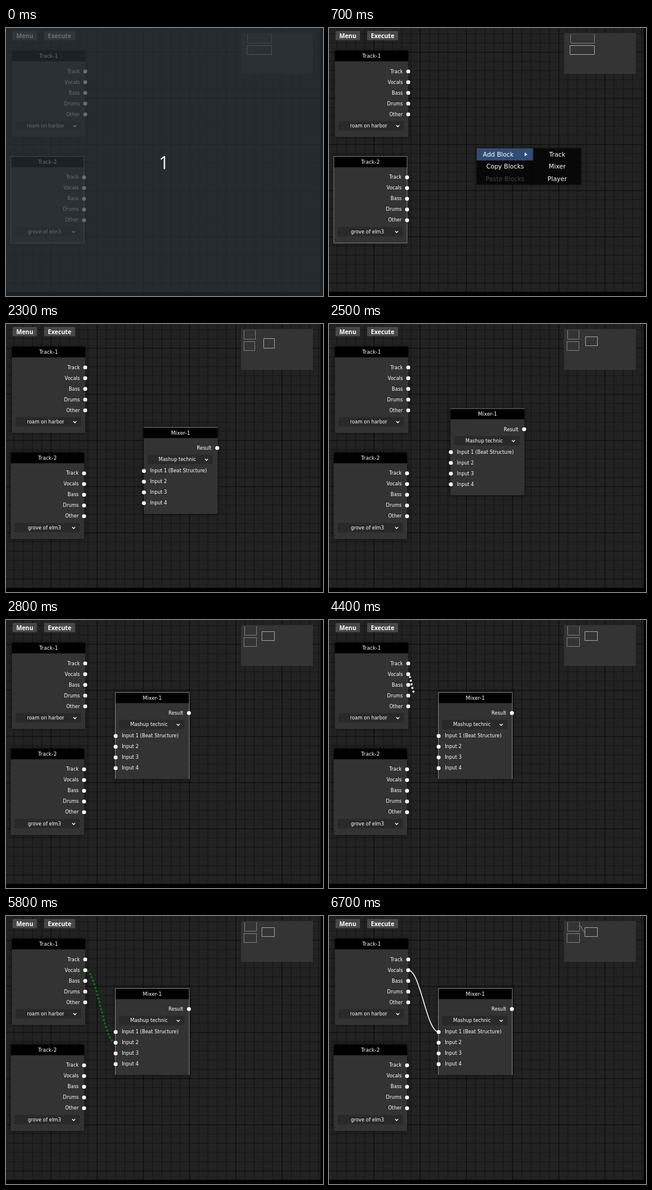
An HTML page with a canvas for the animation above (8000 ms loop, 532 by 450 pixels).

```html
<!DOCTYPE html>
<html lang="en">
<head>
<meta charset="utf-8">
<title>Node editor</title>
<style>
  html, body { margin: 0; width: 100%; height: 100%; overflow: hidden; background: #000; }
  canvas { display: block; }
</style>
</head>
<body>
<canvas id="stage" width="532" height="450"></canvas>
<script>
const ctx = document.getElementById('stage').getContext('2d');
const LOOP = 8000;
const SANS = '"DejaVu Sans", sans-serif';
const STEMS = ['Track', 'Vocals', 'Bass', 'Drums', 'Other'];
const INPUTS = ['Input 1 (Beat Structure)', 'Input 2', 'Input 3', 'Input 4'];
// Mixer positions while it is dragged, one per 100 ms from 2200
const DRAG = [[242, 190], [231, 173.5], [217, 156], [204, 142], [194, 132], [187, 125], [183.5, 121.5]];
const OUT = [133, 91];

function rect(x, y, w, h, fill) {
  ctx.fillStyle = fill;
  ctx.fillRect(x, y, w, h);
}

function rounded(x, y, w, h, r, fill) {
  ctx.fillStyle = fill;
  ctx.beginPath();
  ctx.roundRect(x, y, w, h, r);
  ctx.fill();
}

function label(str, x, y, size, align = 'center', color = '#fff', family = SANS, weight = 400) {
  ctx.font = `${weight} ${size}px ${family}`;
  ctx.textAlign = align;
  ctx.fillStyle = color;
  ctx.fillText(str, x, y + size * 0.36);
}

function line(points, color, width) {
  ctx.strokeStyle = color;
  ctx.lineWidth = width;
  ctx.beginPath();
  points.forEach(p => ctx.lineTo(...p));
  ctx.stroke();
}

function dot(x, y) {
  ctx.fillStyle = '#fff';
  ctx.beginPath();
  ctx.arc(x, y, 3.3, 0, 7);
  ctx.fill();
}

function shadowed(draw, blur) {
  ctx.save();
  ctx.shadowColor = 'rgba(0,0,0,.6)';
  ctx.shadowBlur = blur;
  draw();
  ctx.restore();
}

function grid() {
  rect(0, 0, 532, 450, '#222');
  const rule = (step, x0, y0, width, color) => {
    for (let x = x0; x < 528; x += step) rect(x, 0, width, 443, color);
    for (let y = y0; y < 443; y += step) rect(0, y, 528, width, color);
  };
  rule(15.5, 13, 9, 0.8, 'rgba(0,0,0,.5)');
  rule(77.5, 75, 40, 1.3, 'rgba(0,0,0,.4)');
  rect(528, 0, 4, 450, '#000');
  rect(0, 443, 532, 7, '#000');
}

function nodeFrame({ x, y, w, h, title, border }) {
  shadowed(() => rounded(x, y, w, h, 2, '#333'), 6);
  rounded(x, y, w, 18, [2, 2, 0, 0], '#000');
  label(title, x + w / 2, y + 8.9, 8.7);
  if (!border) return;
  const corners = [[x, y + h], [x, y], [x + w, y], [x + w, y + h], [x, y + h]];
  line(corners.slice(...border), '#8c8c8c', 0.9);
}

function select(str, x, y) {
  rounded(x + 6, y - 8, 110, 16, 2, '#292929');
  label(str, x + 56.5, y, 8);
  line([[x + 103, y - 1], [x + 105.5, y + 1.6], [x + 108, y - 1]], '#fff', 1.3);
}

function trackNode(node) {
  const { x, y, w } = node;
  nodeFrame(node);
  STEMS.forEach((stem, i) => {
    label(stem, x + w - 9, y + 34.8 + i * 18, 8, 'right');
    dot(x + w, y + 35 + i * 18);
  });
  select(node.choice, x, y + 126.2);
}

function mixerNode(node) {
  const { x, y, w } = node;
  nodeFrame(node);
  label('Result', x + w - 10, y + 34.7, 8, 'right');
  dot(x + w - 0.5, y + 34.8);
  select('Mashup technic', x, y + 54);
  INPUTS.forEach((name, i) => {
    label(name, x + 10.7, y + 73 + i * 18, 8, 'left');
    dot(x + 0.5, y + 73.2 + i * 18);
  });
}

function miniMap(nodes, linked) {
  rect(394.5, 8.5, 120.5, 68.5, '#343434');
  const right = Math.max(...nodes.map(n => n.x + n.w));
  const span = nodes.length > 2 ? 51 : 41.3;
  const left = 425.2 - span / 2;
  const px = x => Math.floor(left + (x - 8) * span / (right - 8)) + 0.5;
  const py = y => Math.floor(10.6 + (y - 38) * 0.105) + 0.5;
  nodes.forEach(n => {
    const x0 = px(n.x), x1 = px(n.x + n.w), y0 = py(n.y), y1 = py(n.y + n.h);
    const color = n.border ? '#b0b0b0' : '#858585';
    line([[x0, y0], [x0, y1], [x1, y1], [x1, y0]], color, 0.9);
    line([[x0, y0], [x1, y0]], n.y < 40 ? '#444' : color, 0.9);
  });
  if (linked) line([[421, 16], [423, 18], [427, 25.5], [429, 27]], '#aaa', 0.8);
}

function link(end, color, width, dashOffset) {
  const [x, y] = OUT, [ex, ey] = end, bend = 0.4 * (ex - x);
  ctx.save();
  if (dashOffset !== undefined) {
    ctx.setLineDash([3.1, 3.1]);
    ctx.lineDashOffset = dashOffset;
  }
  ctx.strokeStyle = color;
  ctx.lineWidth = width;
  ctx.beginPath();
  ctx.moveTo(x, y);
  ctx.bezierCurveTo(x + bend, y, ex - bend, ey, ex, ey);
  ctx.stroke();
  ctx.restore();
}

function drawLink(t) {
  if (t < 4400) return;
  if (t >= 6700) return link([184, 194.7], '#fff', 1.55);
  const offset = 2 - 12.4 * (t - 4400) / 1000;
  if (t >= 6100) return link([184, 194.7], '#0a7412', 3.3, offset);
  if (t >= 5400) return link([184, 212.8], '#0a7412', 3.3, offset);
  const k = (t - 4400) / 800;
  link([143.5 + 21.5 * k, 122 + 87 * Math.min(k, 1)], '#fff', 3.2, offset);
}

function menuPanel(x, w, items, active) {
  shadowed(() => rect(x, 202, w, 61, '#080808'), 4);
  items.forEach((item, i) => {
    if (i === active) rect(x, 202 + i * 20.4, w, 20.4, '#314d74');
    const cx = item === 'Add Block' ? x + 36 : x + w / 2;
    label(item, cx, 212.2 + i * 20.4, 10.4, 'center', item === 'Paste Blocks' ? '#444' : '#fff');
  });
}

function contextMenu(t) {
  if (t < 400 || t >= 1500) return;
  const open = t >= 700;
  menuPanel(248, 95, ['Add Block', 'Copy Blocks', 'Paste Blocks'], open ? 0 : -1);
  ctx.fillStyle = '#fff';
  ctx.beginPath();
  ctx.moveTo(328.5, 209);
  ctx.lineTo(332.8, 212.2);
  ctx.lineTo(328.5, 215.4);
  ctx.fill();
  const hover = t < 1000 ? -1 : t < 1200 ? 0 : 1;
  if (open) menuPanel(343, 80, ['Track', 'Mixer', 'Player'], hover);
}

function button(str, x, w) {
  rounded(x, 5, w, 15.5, 1.5, '#484848');
  label(str, x + w / 2, 13, 10.1, 'center', '#fff', '"Noto Sans", sans-serif', 700);
}

function countdown() {
  rect(0, 0, 532, 450, 'rgba(41,47,55,.7)');
  label('1', 265, 226, 30, 'center', '#e4e6e8', '"Noto Sans", sans-serif');
}

function scene(t) {
  const picked = t >= 2200;
  // border: which run of the outline's corners is drawn around a chosen node
  const nodes = [
    { x: 10, y: 38, w: 123, h: 145, title: 'Track-1', choice: 'roam on harbor' },
    { x: 8, y: 215.7, w: 123, h: 145.3, title: 'Track-2', choice: 'grove of elm3', border: picked ? null : [0, 5] }
  ];
  if (t >= 1500) {
    const [x, y] = picked ? DRAG[Math.min(6, Math.floor((t - 2200) / 100))] : [248, 201];
    const border = !picked ? null : t < 2800 ? [1, 3] : [0, 4];
    nodes.push({ x, y, w: 124, h: 145.5, title: 'Mixer-1', border });
  }
  const [track1, track2, mixer] = nodes;

  grid();
  drawLink(t);
  trackNode(track1);
  trackNode(track2);
  if (mixer) mixerNode(mixer);
  miniMap(nodes, t >= 6700);
  button('Menu', 11, 41);
  button('Execute', 64, 52);
  contextMenu(t);
  if (t < 100) countdown();
}

const start = performance.now();
function tick() {
  const t = (performance.now() - start) % LOOP;
  scene(Math.floor(t / 100) * 100);
  requestAnimationFrame(tick);
}
tick();
</script>
</body>
</html>
```
